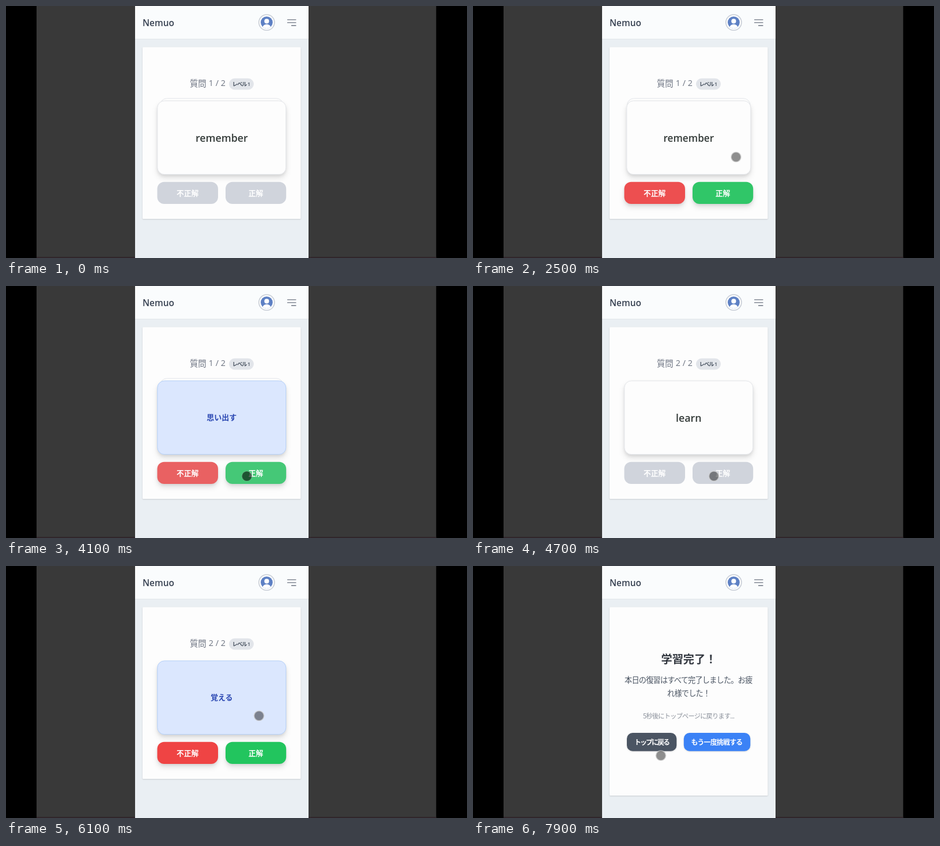
Write an HTML page that moves like this. It is 800x438 px and loops after 8 s.

```html
<!DOCTYPE html>
<html lang="ja">
<head>
<meta charset="utf-8">
<title>Flashcards</title>
<style>
html, body { margin: 0; width: 100%; height: 100%; overflow: hidden; background: #000; }
svg { display: block; width: 100%; height: 100%; }
text { font-family: "Open Sans", "Noto Sans", "Noto Sans CJK JP", "Noto Sans CJK", sans-serif; }
.jp { font-family: "Noto Sans CJK JP", "Noto Sans CJK", "Open Sans", sans-serif; }
.mid { text-anchor: middle; }
.semi { font-weight: 600; }
.bold { font-weight: 700; }
.panel { fill: #fdfdfd; filter: drop-shadow(0 1px 1.2px rgba(0, 0, 0, .14)); }
.lift { filter: drop-shadow(0 6px 5px rgba(0, 0, 0, .11)) drop-shadow(0 2px 2px rgba(0, 0, 0, .07)); }
.btn { filter: drop-shadow(0 1px 1px rgba(0, 0, 0, .15)); }
</style>
</head>
<body>
<svg viewBox="0 0 800 438" xmlns="http://www.w3.org/2000/svg">
  <rect width="800" height="438" fill="#000"/>
  <rect x="53" width="693.5" height="438" fill="#393939"/>
  <rect x="53" y="436" width="693.5" height="2" fill="#30262a"/>

  <rect x="224" width="301" height="438" fill="#eaeff3"/>
  <rect x="224" width="301" height="57.5" fill="#fafcfd"/>
  <rect x="224" y="57" width="301" height="1" fill="#e2e6ea"/>
  <text class="semi" x="237" y="35" font-size="15.4" fill="#374151">Nemuo</text>

  <circle cx="452.4" cy="28.6" r="13.6" fill="#fbfcfd" stroke="#c9ced6" stroke-width="1.6"/>
  <clipPath id="face"><circle cx="452.4" cy="28.6" r="10.4"/></clipPath>
  <g clip-path="url(#face)">
    <rect x="441" y="17" width="23" height="23" fill="#5d80c4"/>
    <circle cx="452.4" cy="26.4" r="4.1" fill="#fff"/>
    <ellipse cx="452.4" cy="38" rx="7.2" ry="6.2" fill="#fff"/>
  </g>
  <path d="M488.5 23.8H503M488.5 28.9H503M495.5 34H503" stroke="#6b7280" stroke-width="1.3" stroke-linecap="round"/>

  <g id="quiz">
    <rect class="panel" x="237" y="71.5" width="274.5" height="298.5" rx="1.5"/>
    <text class="jp" x="319" y="139.5" font-size="14.3" fill="#6b7280">質問</text>
    <text id="count" x="351.8" y="139.3" font-size="14.3" fill="#6b7280"></text>
    <rect x="387" y="125.8" width="43" height="19.6" rx="9.8" fill="#e2e5ea"/>
    <text class="jp semi" x="392.8" y="139.1" font-size="9.4" letter-spacing="-1.1" fill="#4b5563">レベル</text>
    <text class="semi" x="419" y="139.1" font-size="9" fill="#4b5563">1</text>

    <rect id="under" x="267.5" y="160.5" width="213.5" height="120" rx="12" fill="#fdfdfd" stroke="#e5e7eb"/>
    <g id="card">
      <g class="lift"><rect id="face-box" x="-111.5" y="164.9" width="223" height="127.8" rx="12"/></g>
      <text id="front" class="mid semi" y="236.4" font-size="17.8" fill="#333a38"></text>
      <text id="back" class="jp mid bold" y="233.4" font-size="13" fill="#2b48b3"></text>
    </g>

    <g class="lift"><rect id="no" x="262.5" y="305.7" width="105.5" height="38.4" rx="12"/></g>
    <g class="lift"><rect id="yes" x="381" y="305.7" width="105.2" height="38.4" rx="12"/></g>
    <g id="flat" fill="#fdfdfd">
      <path id="flat-rects" d=""/>
    </g>
    <text class="jp mid bold" x="315.2" y="329.8" font-size="12.8" fill="#fff">不正解</text>
    <text class="jp mid bold" x="433.6" y="329.8" font-size="12.8" fill="#fff">正解</text>
  </g>

  <g id="done">
    <rect class="panel" x="237" y="71.5" width="274.5" height="327.5" rx="1.5"/>
    <text class="jp bold" x="326.5" y="169.2" font-size="19.2" fill="#333840">学習完了！</text>
    <g class="jp" fill="#4b5563" font-size="13.2" letter-spacing="-.8">
      <text class="jp" x="263" y="203.3">本日の復習はすべて完了しました。お疲</text>
      <text class="jp" x="337" y="225.6">れ様でした！</text>
    </g>
    <text class="jp" x="295" y="265.2" font-size="11.2" letter-spacing="-.75" fill="#8a909a">5秒後にトップページに戻ります...</text>
    <rect class="btn" x="267" y="290" width="86.3" height="31.8" rx="10" fill="#4b5563"/>
    <rect class="btn" x="365.8" y="290" width="115.5" height="31.8" rx="10" fill="#3b82f6"/>
    <text class="jp semi" x="280" y="310.5" font-size="12" letter-spacing="-2" fill="#fff">トップに戻る</text>
    <text class="jp semi" x="378.6" y="310.5" font-size="12" letter-spacing="-.85" fill="#fff">もう一度挑戦する</text>
  </g>

  <circle id="dot" r="8.6" fill="#000" stroke="#d6d6d6" stroke-opacity=".6" stroke-width="1.8"/>
</svg>
<script>
const $ = id => document.getElementById(id);
const LOOP = 8000, STEP = 100, FLIP = 600, FADE = 150;
const GRAY = [208, 212, 220], RED = [239, 68, 68], GREEN = [34, 197, 94];
const NEXT = 4360, DONE = 7590, SHOW = 2400;

// Card turns: start time, and whether the answer side ends up on top
const turns = [[2400, 1], [4065, 0], [5527, 1], [7040, 0]];
const presses = [[2400, 2500], [3960, 4150], [5430, 5560], [6960, 7090]];
// Pointer moves: start, end, x, y
const moves = [[0, 1, 456.5, 262.5], [3250, 3850, 418, 330.5], [4850, 5350, 440.5, 259.5], [6050, 6750, 326, 329.5]];

const clamp = v => Math.max(0, Math.min(1, v));
const mix = (a, b, k) => a + (b - a) * k;
const blend = (a, b, k) => `rgb(${a.map((v, i) => Math.round(mix(v, b[i], k)))})`;

// cubic-bezier(.4, 0, .2, 1)
function ease(x) {
  let lo = 0, hi = 1;
  for (let i = 0; i < 24; i++) {
    const s = (lo + hi) / 2, r = 1 - s;
    if (1.2 * r * r * s + .6 * r * s * s + s * s * s < x) lo = s; else hi = s;
  }
  return 3 * (1 - lo) * lo * lo + lo ** 3;
}

function toggled(t, length) {
  let v = 0;
  for (const [start, to] of turns) v = mix(v, to, ease(clamp((t - start) / length)));
  return v;
}

function pointer(t) {
  let x = 0, y = 0;
  for (const [a, b, px, py] of moves) {
    const k = ease(clamp((t - a) / (b - a)));
    x = mix(x, px, k);
    y = mix(y, py, k);
  }
  return [x, y];
}

const show = (id, on) => $(id).setAttribute("display", on ? "inline" : "none");

function drawCard(t) {
  const c = Math.cos(toggled(t, FLIP) * Math.PI), answer = c < 0;
  $("card").setAttribute("transform", `translate(374.3 0) scale(${Math.max(.004, Math.abs(c))} 1)`);
  $("face-box").setAttribute("fill", answer ? "#dbe7fe" : "#fdfdfd");
  $("face-box").setAttribute("stroke", answer ? "#b3cff8" : "#e3e5e9");
  show("front", !answer);
  show("back", answer);
}

function drawButtons(t) {
  const k = toggled(t, FADE);
  for (const [id, color] of [["no", RED], ["yes", GREEN]]) {
    $(id).setAttribute("fill", blend(GRAY, color, k));
    $(id).parentNode.setAttribute("class", k > .02 ? "lift" : "");
  }
}

function drawDot(t) {
  const [x, y] = pointer(t), down = presses.some(([a, b]) => t >= a && t < b);
  show("dot", t >= SHOW);
  $("dot").setAttribute("cx", x);
  $("dot").setAttribute("cy", y);
  $("dot").setAttribute("fill-opacity", down ? .58 : .44);
  $("dot").setAttribute("stroke-opacity", down ? .15 : .6);
}

function render(t) {
  const second = t >= NEXT;
  show("quiz", t < DONE);
  show("done", t >= DONE);
  show("under", !second);
  $("count").textContent = second ? "2 / 2" : "1 / 2";
  $("front").textContent = second ? "learn" : "remember";
  $("back").textContent = second ? "覚える" : "思い出す";
  drawCard(t);
  drawButtons(t);
  drawDot(t);
}

$("flat").remove();
const began = performance.now();
function tick() {
  const t = (performance.now() - began) % LOOP;
  render(Math.floor(t / STEP) * STEP);
  requestAnimationFrame(tick);
}
tick();
</script>
</body>
</html>
```
